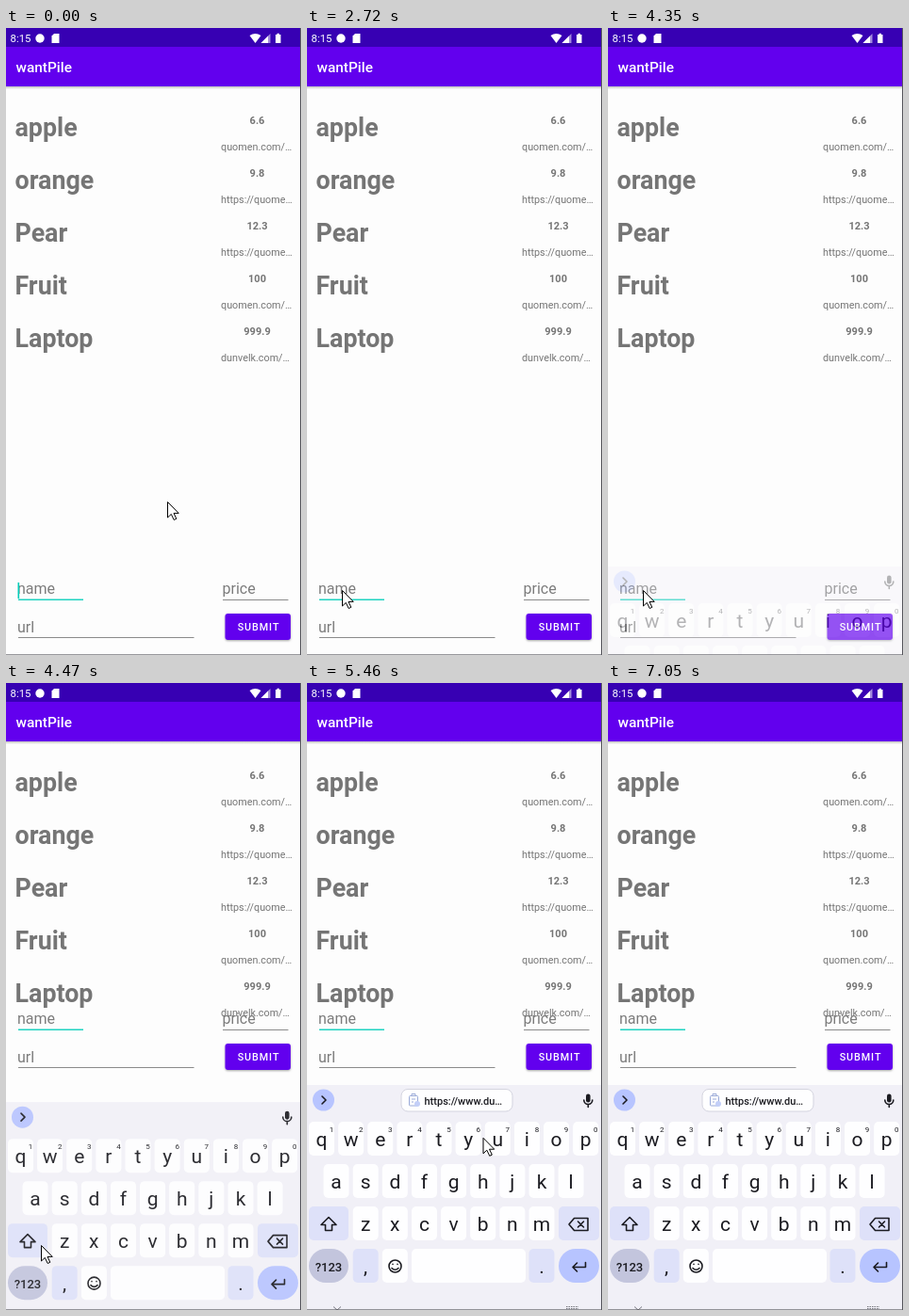
These frames come from a looping animation (313x666 px, 7170 ms). An HTML page:

```html
<!DOCTYPE html>
<html lang="en">
<head>
<meta charset="utf-8">
<title>Shopping list</title>
<style>
  html, body { margin: 0; width: 100%; height: 100%; overflow: hidden; background: #fdfdfd; }
  svg { display: block; width: 100%; height: 100%; font-family: Roboto, sans-serif; }
  .mid { text-anchor: middle; }
  .bold { font-weight: 700; }
  .semi { font-weight: 500; }
  .line { fill: none; stroke: #1b1b21; stroke-width: 1.6; stroke-linecap: round; stroke-linejoin: round; }
</style>
</head>
<body>
<svg viewBox="0 0 313 666">
  <defs>
    <linearGradient id="shade" x2="0" y2="1">
      <stop stop-color="#000" stop-opacity=".25"/>
      <stop offset="1" stop-color="#000" stop-opacity="0"/>
    </linearGradient>
    <filter id="lift" x="-10%" y="-20%" width="120%" height="150%">
      <feDropShadow dx="0" dy="1" stdDeviation="1" flood-opacity=".35"/>
    </filter>
  </defs>
  <rect width="313" height="666" fill="#fdfdfd"/>

  <!-- status and title bars -->
  <rect width="313" height="20" fill="#3700b3"/>
  <rect y="20" width="313" height="42" fill="#6200ee"/>
  <rect y="62" width="313" height="3" fill="url(#shade)"/>
  <g fill="#fff">
    <text x="4.5" y="15" font-size="11.4">8:15</text>
    <circle cx="36" cy="11" r="4.7"/>
    <path d="M51 6h5.5v10h-8V8.500z"/>
    <path d="M258.500 8q6-4 12 0l-6 8z"/>
    <path d="M280.500 6v10h-10z" fill-opacity=".55"/>
    <path d="M278 8.500v7.500h-7.500z"/>
    <path d="M286 7h1.500v-1.200h2.500v1.200h1.500v9h-5.500z"/>
    <text x="10.500" y="47" font-size="15.4" class="semi">wantPile</text>
  </g>

  <g id="list" fill="#757575"></g>

  <g id="form">
    <g fill="#7c7c7c" font-size="16">
      <text x="12" y="601">name</text>
      <text x="229.500" y="601">price</text>
      <text x="12" y="641.500">url</text>
    </g>
    <rect x="13" y="606.500" width="69" height="1.500" fill="#1fd3c1"/>
    <path d="M230 607.500h69.500M13 647.500h186.500" stroke="#8b8b8b"/>
    <rect id="caret" x="12.500" y="589" width="1.600" height="17" fill="#03cdb9"/>
    <rect x="232.500" y="622" width="69.500" height="28" rx="3" fill="#6200ee" filter="url(#lift)"/>
    <text x="268" y="640" class="mid semi" font-size="10.800" letter-spacing=".9" fill="#fff">SUBMIT</text>
  </g>

  <g id="keyboard">
    <rect y="427" width="313" height="239" fill="#f1f0f7"/>
    <circle cx="17.500" cy="443" r="11.500" fill="#b7c4ff"/>
    <path class="line" d="M16 439l4 4-4 4"/>
    <g id="chip">
      <rect x="100" y="431.500" width="118" height="23.500" rx="7" fill="#fefeff" stroke="#d4d4df"/>
      <g fill="none" stroke="#9aaad8">
        <rect x="108.500" y="438.500" width="9" height="10.500" rx="1"/>
        <path d="M111 438v-1.500h4v1.500M111 442h4M111 445h2"/>
      </g>
      <circle cx="117" cy="447" r="3" fill="#c3cff8"/>
      <text x="124.500" y="447.500" font-size="11" class="semi" fill="#1b1b21">https://www.du…</text>
    </g>
    <rect x="296" y="436.500" width="4.600" height="9" rx="2.300" fill="#1b1b21"/>
    <path class="line" d="M293.800 443a4.500 4.500 0 0 0 9 0M298.300 448v2.500"/>
    <g id="keys" fill="#1b1b21"></g>
    <g class="line">
      <path d="M23 567.500l8 8h-4.500v6h-7v-6h-4.500z"/>
      <path d="M278 575l5.500-6.500h14.500v13h-14.500zM287.500 572l6 6M293.500 572l-6 6"/>
      <path d="M295.500 615.500v5h-13M286.500 616l-4.500 4.500 4.500 4.500"/>
      <circle cx="93.500" cy="619.500" r="6.500"/>
      <path d="M90 621.500q3.500 3.500 7 0M91 617.300v.2M96 617.300v.2"/>
    </g>
    <path d="M28 662.500l4 3.500 4-3.500" fill="none" stroke="#77777f"/>
    <path d="M275 662.500h13M275 664.500h13" stroke="#77777f" stroke-dasharray="1.500 1"/>
  </g>

  <path d="M312.500 0v666" stroke="#55555c"/>
  <path d="M0 665.500h313" stroke="#55555c" stroke-opacity=".6"/>
  <path id="pointer" d="M.5.500v16.500l3.800-3.600 2.900 6.100 2.600-1.200-2.800-5.900h5.200z" fill="#fff" stroke="#000" stroke-linejoin="round"/>
</svg>
<script>
const LOOP = 7170, STEP = 120;
const $ = id => document.getElementById(id);
const label = (text, x, y, size, style = '') =>
  `<text x="${x}" y="${y}" font-size="${size}" class="${style}">${text}</text>`;

const items = [
  ['apple', '6.6', 'quomen.com/…'],
  ['orange', '9.8', 'https://quome…'],
  ['Pear', '12.3', 'https://quome…'],
  ['Fruit', '100', 'quomen.com/…'],
  ['Laptop', '999.9', 'dunvelk.com/…']
];
$('list').innerHTML = items.map(([name, price, url], i) => {
  const y = 56 * i;
  return label(name, 9.5, 115 + y, 26.8, 'bold') +
    label(price, 266.5, 101.5 + y, 11, 'mid bold') +
    label(url, 228, 129.5 + y, 10.8);
}).join('');

// keyboard: rows and columns share one pitch each
const COLUMN = 31.13, WHITE = '#fefeff', TINT = '#dee1f9', BLUE = '#b7c4ff';
const rowTop = row => 466 + 45 * row;
const keyBox = (row, x, width, fill = WHITE, rx = 5) =>
  `<rect x="${x}" y="${rowTop(row)}" width="${width}" height="36" rx="${rx}" fill="${fill}"/>`;
const letterKey = (letter, row, column, fill) => {
  const x = 15.5 + COLUMN * column;
  return keyBox(row, x - 13.5, 27, fill) + label(letter, x, rowTop(row) + 25.5, 21, 'mid');
};
const letterRow = (letters, row) =>
  [...letters].map((letter, i) => letterKey(letter, row, i + (10 - letters.length) / 2, WHITE)).join('');
const hints = [...'1234567890'].map((digit, i) => label(digit, 26 + COLUMN * i, 476.5, 8, 'mid')).join('');

$('keys').innerHTML = ['qwertyuiop', 'asdfghjkl', 'zxcvbnm'].map(letterRow).join('') + hints +
  keyBox(2, 2, 42, TINT) + keyBox(2, 267, 43, TINT) +
  keyBox(3, 2, 42, '#c3c5dd', 18) + label('?123', 23, 624.5, 13, 'mid semi') +
  letterKey(',', 3, 1.5, TINT) + letterKey('', 3, 2.5, WHITE) +
  keyBox(3, 111, 121) + letterKey('.', 3, 7.5, TINT) + keyBox(3, 267, 43, BLUE, 18);

// progress of a move, from 0 to 1, advancing once per STEP
const progress = (t, start, steps) =>
  Math.min(1, Math.max(0, Math.floor((t - start) / STEP) / steps));
const easeOut = p => 1 - (1 - p) ** 2;
const easeIn = p => p * p;

// the pointer follows one curve after another: [x, y] start, bend, end
const glides = [
  { start: 1750, steps: 6, ease: easeOut, path: [[171, 503], [60, 730], [37, 597]] },
  { start: 4710, steps: 9, ease: easeOut, path: [[37, 597], [142, 463], [200, 486]] },
  { start: 6320, steps: 4, ease: easeIn, path: [[200, 486], [274, 628], [348, 770]] }
];
function pointerAt(t) {
  const { start, steps, ease, path: [from, bend, to] } =
    glides.findLast(glide => t >= glide.start) || glides[0];
  const e = ease(progress(t, start, steps));
  return from.map((a, i) => a * (1 - e) ** 2 + 2 * bend[i] * e * (1 - e) + to[i] * e * e);
}

// the tap restarts the caret's blinking
const TAP = 3620;
const caretOn = t => Math.floor(t < TAP ? (t + 250) / 500 : (t - TAP) / 490) % 2 === 0;

const shift = (id, x, y) => $(id).setAttribute('transform', `translate(${x} ${y})`);
const show = (id, opacity) => $(id).setAttribute('opacity', +opacity);

const OPEN = 4350;
function draw(t) {
  const left = (1 - progress(t, OPEN, 2)) ** 3;
  shift('keyboard', 0, 145 * left);
  show('keyboard', t >= OPEN && 1 - .68 * left);
  show('chip', left === 0);
  shift('form', 0, left < 1 ? -239 : 0);
  show('caret', caretOn(t));
  shift('pointer', ...pointerAt(t));
}

const begin = performance.now();
function tick() {
  draw((performance.now() - begin) % LOOP);
  requestAnimationFrame(tick);
}
tick();
</script>
</body>
</html>
```
